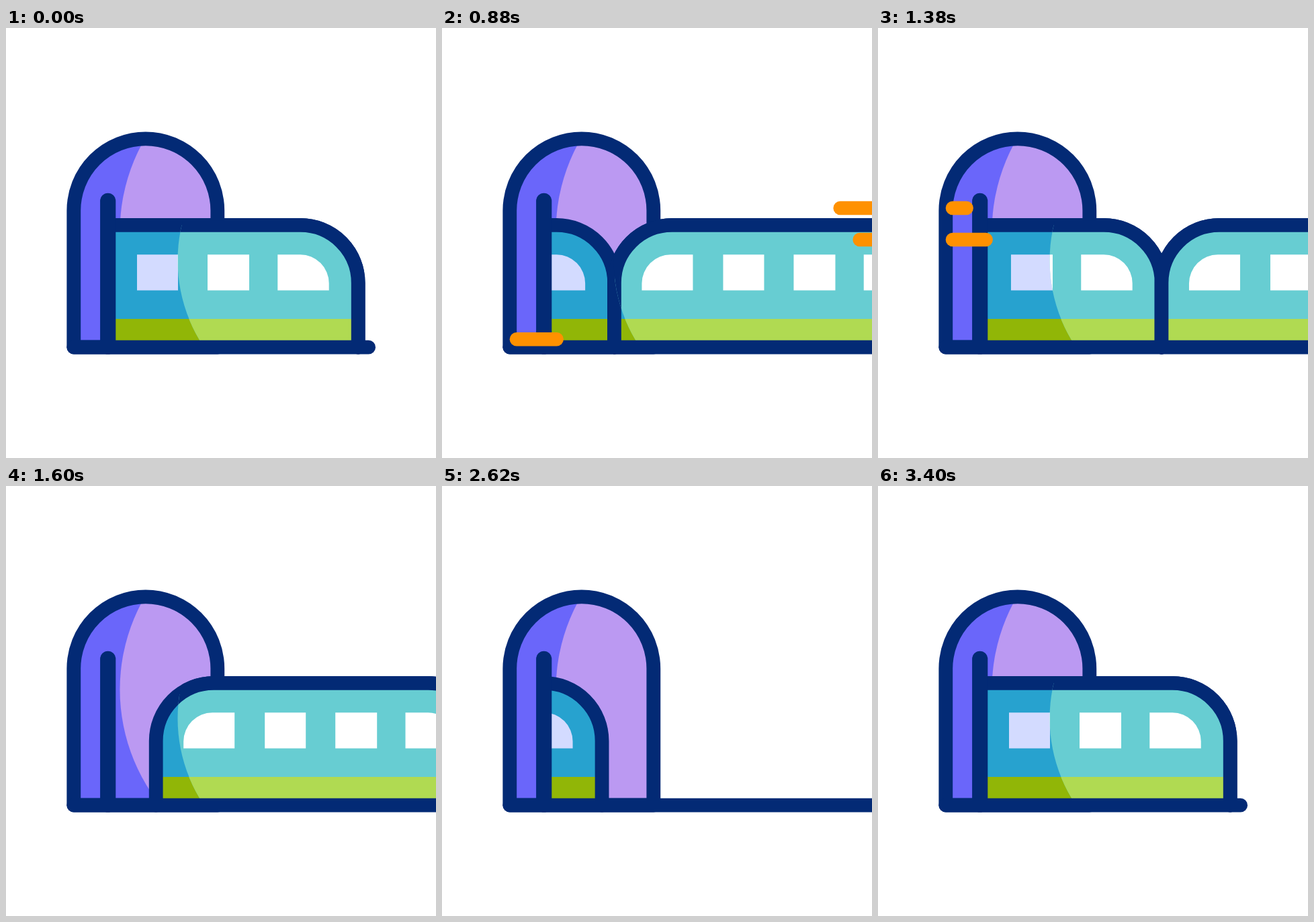
An HTML page that plays this animation: 640x640 px, repeating every 3600 ms.

```html
<!DOCTYPE html>
<html lang="en">
<head>
<meta charset="utf-8">
<title>Train leaving a tunnel</title>
<style>
  html, body { margin: 0; width: 100%; height: 100%; overflow: hidden; background: #fff; }
  svg { display: block; width: 100vw; height: 100vh; }
  .line { fill: none; stroke: #032a75; stroke-width: 20.8; stroke-linecap: round; stroke-linejoin: round; }
  .shade { --body: #27a2cf; --stripe: #91b607; --glass: #d3dbff; }
  .lit { --body: #67cdd2; --stripe: #b0da52; --glass: #fff; }
  .body { fill: var(--body); }
  .stripe { fill: var(--stripe); }
  .glass { fill: var(--glass); }
  #streaks { stroke: #ff9100; stroke-width: 20.6; stroke-linecap: round; }
</style>
</head>
<body>
<svg viewBox="0 0 640 640">
  <defs>
    <path id="arch" d="M100.8 475V271.8A107 107 0 0 1 314.8 271.8V475Z"/>
    <path id="shell" d="M33 475V379.5A86 86 0 0 1 119 293.4H438A86 86 0 0 1 524.2 379.5V475"/>
    <g id="car">
      <use href="#shell" class="body"/>
      <path class="stripe" d="M33 433H524V475H33Z"/>
      <path class="glass" d="M150 337.3V390.6H74V380A43 43 0 0 1 117 337.3Z
        M195 337.3H256V390.6H195Z M300 337.3H362V390.6H300Z
        M404.3 337.3H438A42.7 42.7 0 0 1 480.7 380V390.6H404.3Z"/>
      <use href="#shell" class="line"/>
    </g>
    <g id="train">
      <use href="#car" x="-982"/>
      <use href="#car" x="-491"/>
      <use href="#car"/>
    </g>
    <clipPath id="inArch"><use href="#arch"/></clipPath>
    <clipPath id="exit"><path d="M152 0H640V640H152Z"/></clipPath>
    <clipPath id="light"><circle cx="487.5" cy="346" r="232"/></clipPath>
  </defs>

  <use href="#arch" fill="#6a66fa"/>
  <circle cx="445.5" cy="303" r="276" fill="#bb99f2" clip-path="url(#inArch)"/>
  <use href="#arch" class="line"/>

  <g clip-path="url(#exit)">
    <g class="shade"><use href="#train" class="mover"/></g>
    <g class="lit" clip-path="url(#light)"><use href="#train" class="mover"/></g>
  </g>

  <path class="line" style="stroke-width:23.2" d="M151.7 257.3V474"/>
  <line id="ground" class="line" x1="100.8" y1="475.2" x2="539.6" y2="475.2"/>
  <g id="streaks"></g>
</svg>
<script>
  const LOOP = 3600;
  const SPEED = 1.1;
  const CAP = 10.3;

  // [start, end, from, to]
  const TRAIN = [
    [0, 400, 0, -72],
    [400, 2200, -72, 1606],
    [2200, 3400, -399, 0]
  ];
  const GROUND = [
    [0, 400, 539.6, 659.6],
    [3000, 3400, 659.6, 539.6]
  ];
  // [time, left edge at that time, length, y]
  const STREAKS = [
    [600, 304, 109, 418.7],
    [600, 369, 121, 463.3],
    [1140, 297.5, 109.5, 268],
    [1140, 326.5, 109.5, 315]
  ];

  const movers = document.querySelectorAll('.mover');
  const ground = document.getElementById('ground');
  const streakBox = document.getElementById('streaks');
  const streaks = STREAKS.map(([, , , y]) => {
    const el = document.createElementNS('http://www.w3.org/2000/svg', 'line');
    el.setAttribute('y1', y);
    el.setAttribute('y2', y);
    return streakBox.appendChild(el);
  });

  const smooth = u => u * u * (3 - 2 * u);

  function track(steps, t) {
    const [start, end, from, to] = steps.filter(s => s[0] <= t).pop();
    return from + (to - from) * smooth(Math.min(1, (t - start) / (end - start)));
  }

  function draw(t) {
    const shift = `translate(${track(TRAIN, t)} 0)`;
    movers.forEach(el => el.setAttribute('transform', shift));
    ground.setAttribute('x2', track(GROUND, t));

    STREAKS.forEach(([time, x, length], i) => {
      const left = x - SPEED * (t - time);
      const a = Math.max(left + CAP, 111);
      const b = left + length - CAP;
      const el = streaks[i];
      el.setAttribute('x1', a);
      el.setAttribute('x2', b);
      el.setAttribute('visibility', b > a ? 'visible' : 'hidden');
    });
  }

  const origin = performance.now();
  function tick() {
    draw((performance.now() - origin) % LOOP);
    requestAnimationFrame(tick);
  }
  tick();
</script>
</body>
</html>
```
